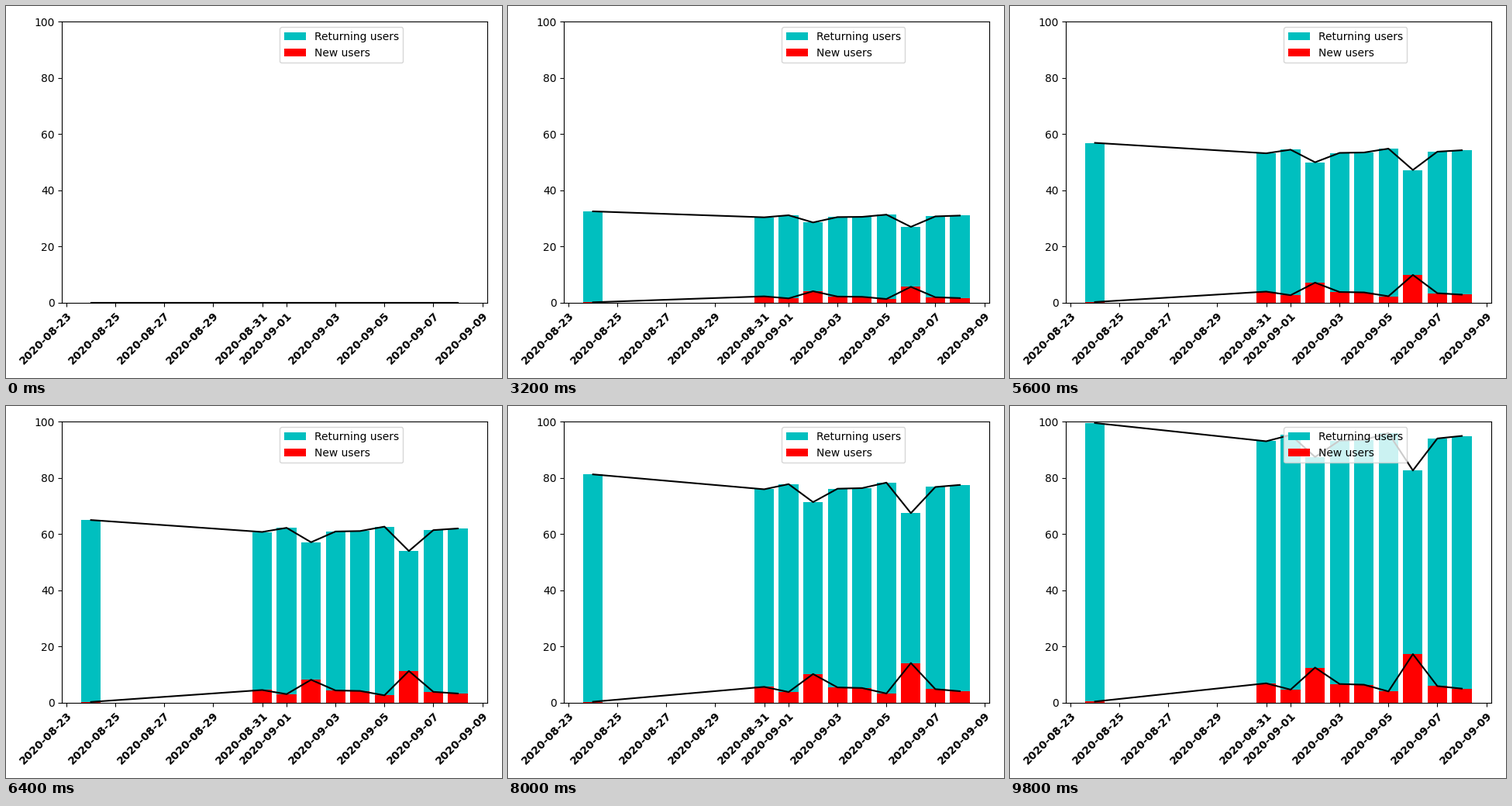
Recreate the animation shown at these times as a matplotlib script. Size 640 px wide and 480 px high, loop 10000 ms.

```python
import matplotlib.pyplot as plt
import numpy as np
from matplotlib.animation import FuncAnimation

FRAMES = 50
START = np.datetime64("2020-08-23")

# Days since START, and the share of new users on each of them
days = np.r_[1, 8:17]
new = np.array([0.4, 6.9, 4.65, 12.5, 6.65, 6.4, 4, 17.3, 5.9, 5])

plt.rcParams["font.family"] = "DejaVu Sans"
fig, ax = plt.subplots(figsize=(6.4, 4.8), dpi=100)

series = []
for share, color, label in [(100 - new, "c", "Returning users"),
                            (new, "r", "New users")]:
    bars = ax.bar(days, share, width=0.8, color=color, label=label)
    line, = ax.plot(days, share, color="k", lw=1.5)
    series.append((share, bars, line))

# Every other day, starting again at the first of the month
ticks = np.r_[0:9:2, 9:18:2]
first, last = days[0] - 0.4, days[-1] + 0.4
margin = 0.05 * (last - first)
ax.set_xlim(first - margin, last + margin)
ax.set_ylim(0, 100)
ax.set_xticks(ticks, [str(START + t) for t in ticks], rotation=45,
              ha="right", rotation_mode="anchor", weight="bold")
ax.legend(loc="upper left", bbox_to_anchor=(0.5, 1))
fig.tight_layout()
fig.subplots_adjust(left=72.1 / 640, bottom=97.2 / 480)


def update(i):
    grow = i / (FRAMES - 1)
    artists = []
    for share, bars, line in series:
        for bar, value in zip(bars, share * grow):
            bar.set_height(value)
        line.set_ydata(share * grow)
        artists += [*bars, line]
    return artists


anim = FuncAnimation(fig, update, frames=FRAMES, interval=200, repeat=True)
plt.show()
```
